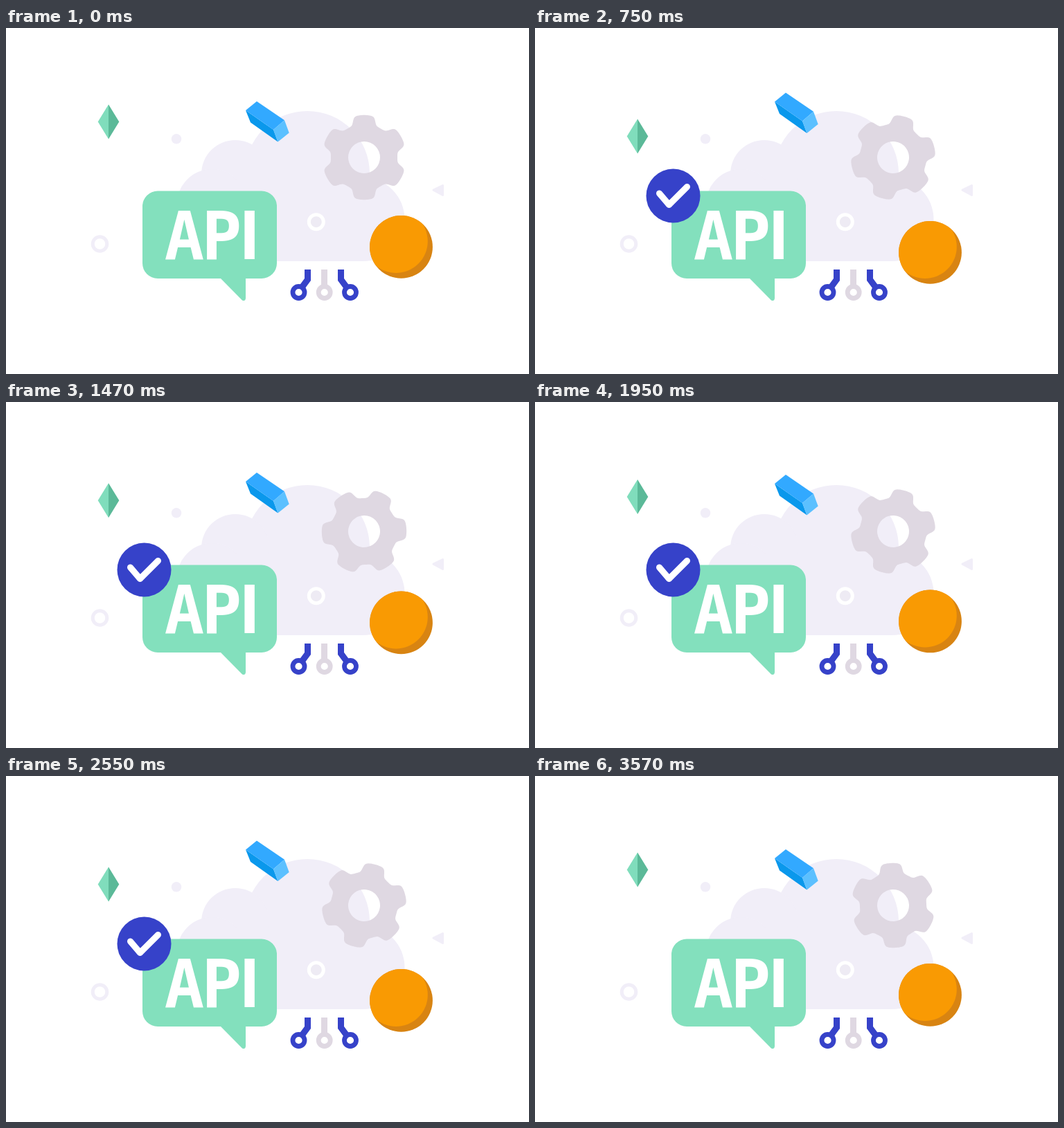
Animation of 755x500 px, one loop 3600 ms. Source, as an HTML page:

```html
<!DOCTYPE html>
<html lang="en">
<head>
<meta charset="utf-8">
<title>API cloud</title>
<style>
  html, body { margin: 0; width: 100%; height: 100%; overflow: hidden; background: #fff; }
  svg { display: block; width: 755px; height: 500px; }
  text { font: 700 96px "DejaVu Sans Mono", monospace; fill: #fff; }
  .plain { font: 700 98.5px Roboto, sans-serif; }
</style>
</head>
<body>
<svg viewBox="0 0 755 500" xmlns="http://www.w3.org/2000/svg">
  <defs>
    <clipPath id="disc"><circle cx="570.5" cy="316.4" r="45.4"/></clipPath>
  </defs>

  <g id="cloud" fill="#f1eef8">
    <circle cx="435" cy="210" r="90"/>
    <circle cx="331" cy="211" r="49"/>
    <circle cx="297" cy="254" r="50"/>
    <circle cx="515" cy="276.5" r="60.5"/>
    <path d="M296 220H515V337H296Z"/>
  </g>

  <g id="decor" fill="#f1eef8">
    <circle cx="246" cy="160.3" r="7.3"/>
    <circle cx="135.5" cy="312" r="10.3" fill="none" stroke="#f1eef8" stroke-width="5"/>
    <path d="M617 234.2L630.5 227.5V241.5Z" stroke="#f1eef8" stroke-width="3" stroke-linejoin="round"/>
    <circle cx="447.8" cy="280.2" r="10.5" fill="#eeebf4" stroke="#fff" stroke-width="5"/>
  </g>

  <g id="wires" fill="none" stroke="#3642c9" stroke-width="9">
    <path d="M435.5 349V363.5L427 375M483.5 349V363.5L492 375"/>
    <path d="M459.5 349V374" stroke="#dfd8e2"/>
    <g fill="#fff" stroke-width="6.8">
      <circle cx="422.5" cy="382" r="8.5"/>
      <circle cx="459.7" cy="382" r="8.5" stroke="#dfd8e2"/>
      <circle cx="497" cy="382" r="8.5"/>
    </g>
  </g>

  <path id="gear" fill="#dfd8e2" fill-rule="evenodd"/>

  <g id="bar">
    <path d="M346 119L386 147L392.5 164.5L353 136.5Z" fill="#0a98ec"/>
    <path d="M346 119L362 106L402 133.3L386 147Z" fill="#32a9ff"/>
    <path d="M402 133.3L408.7 151.5L392.5 164.5L386 147Z" fill="#5cc0ff"/>
  </g>

  <g id="gem">
    <path d="M148 110.5L132.7 135.5L148 160.5Z" fill="#80ddbc"/>
    <path d="M148 110.5L163.3 135.5L148 160.5Z" fill="#5bb998"/>
  </g>

  <g id="bubble">
    <rect x="197" y="235.5" width="194" height="126.5" rx="22" fill="#83e0bd"/>
    <path d="M309 361H346V390.5Q345.5 395.5 341 393.5Z" fill="#83e0bd"/>
    <text x="228.6 282.5" y="334">AP<tspan class="plain" x="337.3">I</tspan></text>
  </g>

  <g id="coin">
    <circle cx="570.5" cy="316.4" r="45.4" fill="#d88412"/>
    <circle cx="563" cy="308.2" r="45.8" fill="#f99a03" clip-path="url(#disc)"/>
  </g>

  <g id="tick">
    <circle r="39" fill="#3642c9"/>
    <path d="M-20 -3.5L-6 13L20 -13" fill="none" stroke="#fff" stroke-width="9" stroke-linecap="round" stroke-linejoin="round"/>
  </g>
</svg>
<script>
  const LOOP = 3600, STEP = 30, BOB = 1800;
  const el = id => document.getElementById(id);
  const [gear, bar, gem, coin, tick] = ["gear", "bar", "gem", "coin", "tick"].map(el);
  const move = (node, value) => node.setAttribute("transform", value);
  const clamp = x => Math.min(1, Math.max(0, x));

  function gearPath() {
    const points = [];
    for (let a = 0; a < 360; a += 1.5) {
      const rad = a * Math.PI / 180;
      const r = 54.5 + 6.7 * Math.tanh(2.6 * (Math.cos(6 * rad) + 0.22));
      points.push((r * Math.sin(rad)).toFixed(2) + " " + (-r * Math.cos(rad)).toFixed(2));
    }
    return "M" + points.join("L") + "ZM23 0A23 23 0 1 0 -23 0A23 23 0 1 0 23 0Z";
  }

  const backIn = x => x * x * (2.7 * x - 1.7);

  // Pops in with an overshoot, pops out mirrored.
  function tickScale(t) {
    return t < LOOP / 2
      ? 1 - backIn(1 - clamp((t - 100) / 500))
      : 1 - backIn(clamp((t - 3000) / 500));
  }

  function draw(now) {
    const t = Math.floor((now % LOOP) / STEP) * STEP;
    const bob = (1 - Math.cos(2 * Math.PI * t / BOB)) / 2;
    move(gear, `translate(517 187) rotate(${t / 10})`);
    move(bar, `translate(0 ${-13.4 * bob})`);
    move(gem, `translate(0 ${22.5 * bob})`);
    move(coin, `translate(0 ${8.5 * bob})`);
    move(tick, `translate(199.5 242.5) scale(${Math.max(0, tickScale(t))})`);
  }

  gear.setAttribute("d", gearPath());
  const start = performance.now();
  function frame() {
    draw(performance.now() - start);
    requestAnimationFrame(frame);
  }
  draw(0);
  requestAnimationFrame(frame);
</script>
</body>
</html>
```
